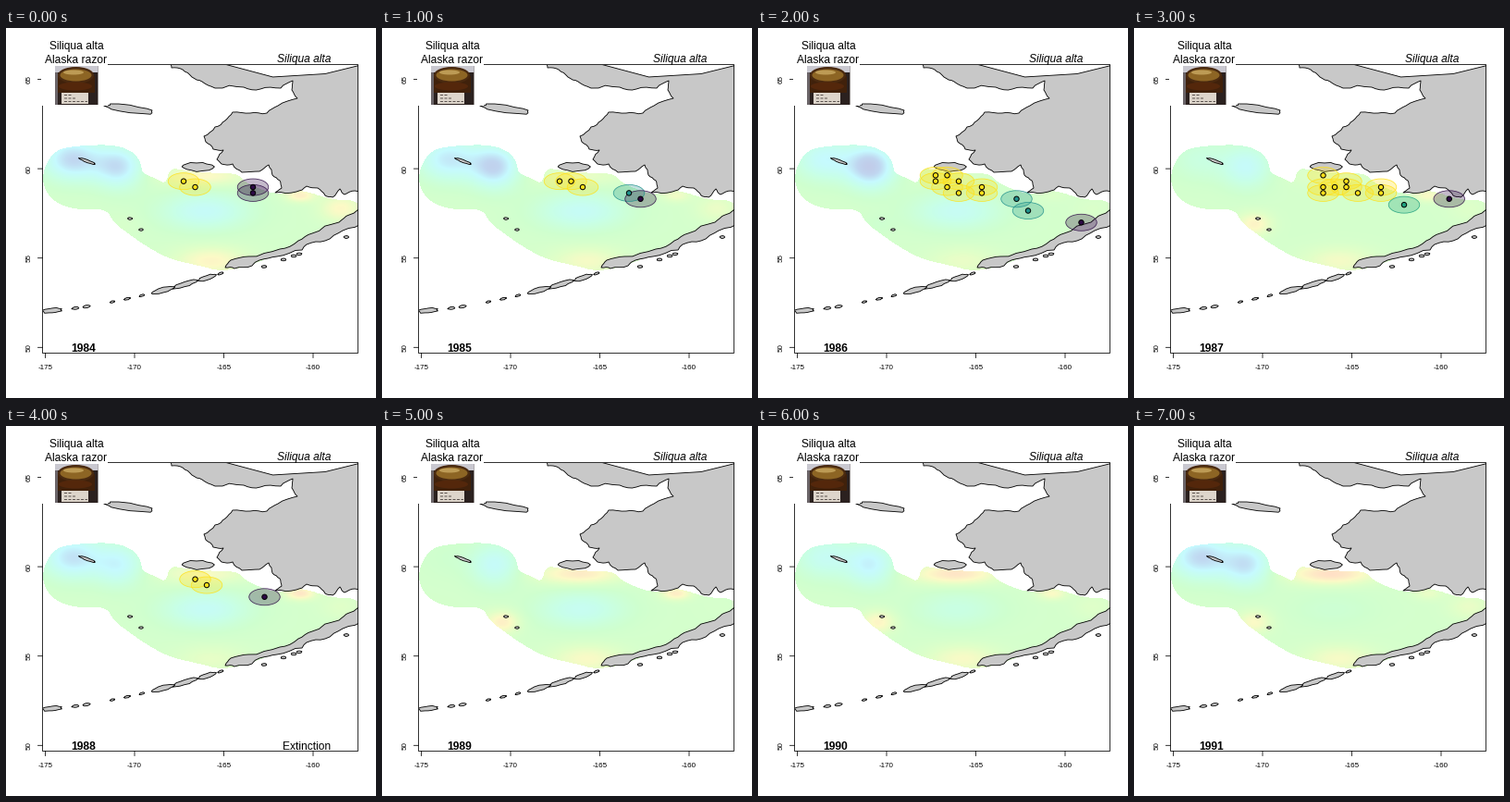
These frames come from a looping animation (400x400 px, 8 s). A matplotlib script:

```python
import numpy as np
import matplotlib.pyplot as plt
from matplotlib.animation import ArtistAnimation
from matplotlib.patches import Circle, Ellipse, Polygon, Rectangle
from matplotlib.path import Path

SIZE = 400
PX = 0.72  # points per pixel at 100 dpi
LEFT, TOP, RIGHT, BOTTOM = 39.5, 39.5, 380.5, 351.5
rng = np.random.default_rng(7)

plt.rcParams["font.family"] = "Liberation Sans"
plt.rcParams["path.snap"] = False
fig = plt.figure(figsize=(4, 4), dpi=100, facecolor="white")
ax = fig.add_axes([0, 0, 1, 1])
frame_box = Rectangle((LEFT, TOP), RIGHT - LEFT, BOTTOM - TOP, fill=False,
                      ec="black", lw=0.8 * PX, zorder=6)
ax.add_patch(frame_box)


def label(x, y, text, size=12, va="baseline", **kw):
    return ax.text(x, y, text, fontsize=size * PX, ha="center", va=va,
                   zorder=8, **kw)


def land(points):
    patch = Polygon(points, fc="#c8c8c8", ec="black", lw=0.85 * PX,
                    joinstyle="round", zorder=3)
    ax.add_patch(patch)
    patch.set_clip_path(frame_box)


def rough(points, rounds=2, amount=0.1):
    """Split every edge and push its middle sideways."""
    p = np.array(points, float)
    for _ in range(rounds):
        step = np.roll(p, -1, axis=0) - p
        push = rng.uniform(-amount, amount, (len(p), 1))
        middle = p + step / 2 + push * step[:, ::-1] * (1, -1)
        p = np.stack([p, middle], axis=1).reshape(-1, 2)
    return p


def smooth(points, rounds=3):
    """Cut the corners of a closed outline."""
    p = np.array(points, float)
    for _ in range(rounds):
        q = np.roll(p, -1, axis=0)
        p = np.stack([0.75 * p + 0.25 * q, 0.25 * p + 0.75 * q],
                     axis=1).reshape(-1, 2)
    return p


def island(x, y, length, height, slope=0.0):
    a = np.linspace(0, 2 * np.pi, 16, endpoint=False)
    r = rng.uniform(0.8, 1.1, a.size)
    dx = length * r * np.cos(a)
    land(np.column_stack([x + dx, y + height * r * np.sin(a) + slope * dx]))


# Axes and titles
for i in range(4):
    x = 42.5 + 96.5 * i
    y = 55.5 + 96.6 * i
    ax.plot([x, x], [BOTTOM, BOTTOM + 5], color="black", lw=0.8 * PX)
    ax.plot([LEFT - 5, LEFT], [y, y], color="black", lw=0.8 * PX)
    label(x, 369, str(-175 + 5 * i), 8)
    label(25.5, y, str(65 - 5 * i), 8, rotation=90, va="center")
label(76, 23, "Siliqua alta")
label(76, 38, "Alaska razor")
label(322.5, 37, "Siliqua alta", style="italic")

# Coasts
mainland = [(177, 36), (179, 43), (191, 45), (201, 53), (212, 58), (226, 65),
            (257, 64), (275, 66), (297, 65), (310, 57), (309, 67), (315, 76),
            (294, 84), (282, 92), (264, 92), (245, 91), (237, 100),
            (226, 107), (214, 117), (216, 123), (224, 131), (235, 132),
            (228, 142), (233, 147), (245, 147), (255, 156), (274, 155),
            (284, 148), (288, 159), (296, 165), (298, 173), (291, 178),
            (314, 177), (325, 171), (337, 173), (345, 181), (353, 183),
            (361, 174), (366, 180), (377, 176), (400, 172), (400, 36)]
peninsula = [(390, 194), (371, 202), (360, 210), (331, 222), (316, 230),
             (296, 239), (262, 247), (243, 251), (237, 259), (247, 260),
             (266, 257), (274, 251), (293, 247), (320, 240), (325, 234),
             (345, 230), (364, 219), (390, 211)]
land(rough(mainland))
land(rough(peninsula))
island(206, 150, 18, 5)
island(134, 87.5, 29, 4, 0.12)
island(88, 144, 9, 1.6, 0.36)
island(134, 206, 2.6, 1.2)
island(146, 218, 2.6, 1.2)

# The island arc climbs eastward
for x, length in [(50, 11), (75, 4), (87, 4), (115, 2.5), (131, 3.5),
                  (147, 3), (170, 13), (193, 13), (217, 10), (232, 3)]:
    u = (x - 40) / 190
    island(x, 306 - 40 * u ** 1.5, length, min(3, 0.6 + 0.2 * length),
           -0.33 * np.sqrt(u))
for x in (279, 300, 311, 317, 368):
    island(x, 258 - 0.36 * (x - 279), 2.8, 1.4)


# Jar picture on its white ground
def block(x, y, w, h, color):
    ax.add_patch(Rectangle((x, y), w, h, fc=color, ec="none", zorder=7))


def oval(x, y, w, h, color):
    ax.add_patch(Ellipse((x, y), w, h, fc=color, ec="none", zorder=7))


block(38, 38, 72, 46, "white")
block(53, 41, 46.5, 42, "#2b211f")
block(53, 41, 46.5, 7, "#c9c8d0")
block(53, 48, 3, 35, "#6b6468")
block(56, 52, 40, 18, "#40210b")
oval(75.5, 51, 39, 18, "#4a2a10")
oval(75.5, 51, 34, 13, "#8d6524")
oval(73, 48, 22, 5, "#bd9b55")
oval(75, 63, 36, 9, "#54270b")
block(60, 70, 29, 12, "#ddd5cb")
for y, end in ((72.5, 72), (76, 76), (79.5, 88)):
    ax.plot([63, end], [y, y], color="#5c5450", lw=PX, ls=(0, (3, 1.5)),
            zorder=7)

# Temperature field: a mild base plus warm and cold spots
shelf = smooth([(39, 162), (44, 145), (55, 131), (80, 127), (118, 126),
                (138, 134), (146, 146), (147, 157), (163, 163), (173, 169),
                (177, 151), (193, 154), (225, 157), (250, 157), (260, 168),
                (292, 181), (318, 174), (352, 186), (382, 186), (382, 206),
                (300, 243), (240, 265), (205, 256), (177, 250), (150, 235),
                (132, 222), (117, 211), (108, 195), (80, 197), (55, 190),
                (43, 177)])
spots = [  # centre and spread in x and y
    (72, 142, 32, 23), (122, 150, 26, 23), (215, 198, 48, 20),
    (130, 212, 18, 12), (222, 252, 38, 15), (213, 160, 45, 11),
    (318, 181, 16, 7), (362, 195, 22, 14)]
strength = {
    1984: (-3.2, -2.9, -2.0, 0.2, 1.9, 1.8, 2.2, 1.8),
    1986: (-2.2, -3.7, -1.8, -0.3, 1.0, 0.3, 0.4, 0.3),
    1987: (-1.0, -2.0, 0.0, 2.0, 1.4, 0.6, 1.6, 0.5),
    1988: (-2.9, -2.2, -1.9, 0.0, 0.9, 1.6, 2.6, 0.6),
    1989: (-0.3, -2.0, -1.7, 2.2, 1.6, 2.4, 2.3, 0.1),
    1991: (-3.2, -2.8, -0.5, 1.7, 1.5, 2.9, 1.0, 1.0),
}
for year in (1985, 1990):
    strength[year] = np.mean([strength[year - 1], strength[year + 1]], axis=0)

# Lavender, blue, cyan, aqua, green, lime, yellow, orange, pink
palette = np.array([(194, 198, 230), (192, 214, 240), (198, 250, 255),
                    (200, 255, 232), (207, 255, 207), (226, 255, 200),
                    (252, 250, 198), (255, 228, 198), (255, 210, 200)]) / 255
gx, gy = np.meshgrid(np.arange(40, 380) + 0.5, np.arange(120, 270) + 0.5)
inside = Path(shelf).contains_points(
    np.column_stack([gx.ravel(), gy.ravel()])).reshape(gx.shape)


def field(year):
    value = np.full(gx.shape, 4.3)
    for s, (cx, cy, sx, sy) in zip(strength[year], spots):
        value += s * np.exp(-((gx - cx) / sx) ** 2 - ((gy - cy) / sy) ** 2)
    steps = np.arange(len(palette))
    rgb = [np.interp(value, steps, palette[:, c]) for c in range(3)]
    return np.dstack(rgb + [inside.astype(float)])


# Catches by abundance, at (column, row) of the survey grid
YELLOW, TEAL, GREEN, PURPLE = "#ffe119", "#21918c", "#1fa07e", "#2d0a45"
catches = {
    1984: {YELLOW: [(0, 1), (1, 2)], PURPLE: [(6, 2), (6, 3)]},
    1985: {YELLOW: [(0, 1), (1, 1), (2, 2)], TEAL: [(6, 3)],
           PURPLE: [(7, 4)]},
    1986: {YELLOW: [(0, 0), (1, 0), (0, 1), (2, 1), (1, 2), (2, 3), (4, 2),
                    (4, 3)],
           TEAL: [(7, 4), (8, 6)], PURPLE: [(12.6, 8)]},
    1987: {YELLOW: [(1, 0), (1, 2), (1, 3), (2, 2), (3, 1), (3, 2), (4, 3),
                    (6, 2), (6, 3)],
           GREEN: [(8, 5)], PURPLE: [(11.9, 4)]},
    1988: {YELLOW: [(1, 1), (2, 2)], PURPLE: [(7, 4)]},
}


def draw_catches(year):
    marks = []
    for color, stations in catches.get(year, {}).items():
        for col, row in stations:
            at = (192 + 12.5 * col, 159.3 + 6.37 * row)
            marks += [
                Ellipse(at, 33.5, 18, fc=color, ec="none", alpha=0.28,
                        zorder=4),
                Ellipse(at, 33.5, 18, fill=False, ec=color, lw=0.8 * PX,
                        alpha=0.85, zorder=4.1),
                Circle(at, 2.7, fc=color, ec="black", lw=PX, zorder=5)]
    for mark in marks:
        ax.add_patch(mark)
    return marks


frames = []
for year in range(1984, 1992):
    sea = ax.imshow(field(year), extent=(40, 380, 270, 120), zorder=1,
                    interpolation="nearest", aspect="auto")
    artists = [sea, label(84, 350, str(year), weight="bold")]
    artists += draw_catches(year)
    if year == 1988:
        artists.append(label(325, 350, "Extinction"))
    frames.append(artists)
ax.set_xlim(0, SIZE)
ax.set_ylim(SIZE, 0)
ax.axis("off")

anim = ArtistAnimation(fig, frames, interval=1000, repeat=True,
                       repeat_delay=0, blit=False)
plt.show()
```
